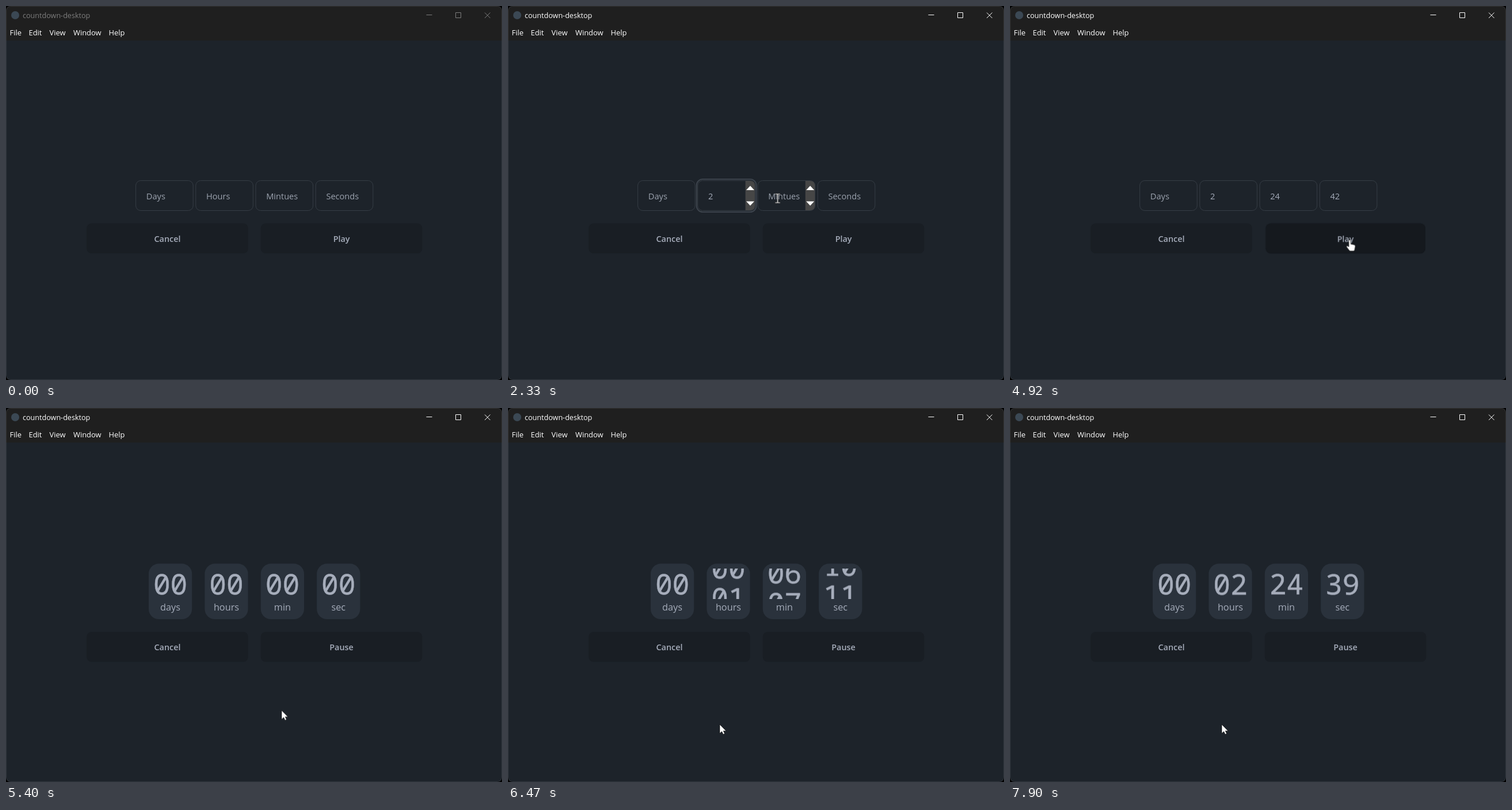
An HTML page for the animation above (8 s loop, 862 by 650 pixels).

```html
<!DOCTYPE html>
<html lang="en">
<head>
<meta charset="utf-8">
<title>countdown-desktop</title>
<style>
  html, body { margin: 0; width: 100%; height: 100%; overflow: hidden; background: #000; }
  svg { display: block; border-radius: 8px; background: #1d232a; font: 14.6px 'Open Sans', sans-serif; }
  text { fill: #a6adbb; white-space: pre; }
  .chrome { color: #fff; font-size: 12.6px; animation: wake 8s step-end infinite; }
  .chrome text { fill: currentColor; }
  .chrome path { fill: none; stroke: currentColor; }
  .menu text { fill: #fff; font-size: 12.9px; }
  .field { fill: none; stroke: #363d45; }
  .ring { fill: none; stroke: #3c434c; stroke-width: 2; }
  .placeholder { fill: #9ca3af; }
  .button { fill: #191e24; }
  .hover { fill: #15191e; }
  .label { font-size: 14.4px; font-weight: 600; text-anchor: middle; }
  .card { fill: #2a323c; }
  .unit { font-size: 16.3px; text-anchor: middle; }
  .digits { font: 49.5px 'Noto Sans Mono', monospace; text-anchor: middle; animation: roll 8s infinite; }
  .digits text { stroke: #a6adbb; stroke-width: .5; }
  .mouse { animation: move 8s infinite; }
  .mouse path { fill: #fff; stroke: #000; stroke-width: .6; stroke-linejoin: round; }

  @keyframes wake { 0% { color: #7d7d7d } 19.375%, 100% { color: #fff } }
  @keyframes roll {
    0%, 74.85% { transform: translateY(0); animation-timing-function: cubic-bezier(1, 0, 0, 1) }
    87.35% { transform: translateY(calc(var(--first) * -52.3px)); animation-timing-function: cubic-bezier(1, 0, 0, 1) }
    99.85%, 100% { transform: translateY(calc(var(--second) * -52.3px)) }
  }
  @keyframes move {
    0%, 2.375% { transform: translate(622px, 574px); animation-timing-function: linear }
    6.25% { transform: translate(520px, 505px); animation-timing-function: linear }
    9.375% { transform: translate(415px, 436px); animation-timing-function: linear }
    11.75% { transform: translate(393px, 384px); animation-timing-function: ease-out }
    16%, 24.375% { transform: translate(380px, 336px); animation-timing-function: ease-in-out }
    31%, 37.5% { transform: translate(486px, 334px); animation-timing-function: ease-in }
    40.125% { transform: translate(546px, 332px); animation-timing-function: linear }
    41% { transform: translate(572px, 332px); animation-timing-function: ease-out }
    43.125%, 55.375% { transform: translate(588px, 334px); animation-timing-function: ease-in-out }
    59.75%, 62.5% { transform: translate(590.5px, 406.5px); animation-timing-function: ease-out }
    67.5% { transform: translate(479px, 525.5px); animation-timing-function: ease-out }
    71.875%, 74.125% { transform: translate(472px, 528px); animation-timing-function: ease-in-out }
    78.75%, 100% { transform: translate(368px, 550px) }
  }
</style>
</head>
<body>
<svg id="stage" width="862" height="650" viewBox="0 0 862 650"></svg>
<script>
const LOOP = 8000;
const SWITCH = 4990;
const PRESS = 4850;
const WIDTH = 99.6;

// Alternating show and hide times in ms
const on = (...times) => `data-on="${times.join(' ')}"`;
const box = (x, y, w, h, r, attrs) =>
  `<rect x="${x}" y="${y}" width="${w}" height="${h}" rx="${r}" ${attrs}/>`;
const text = (x, y, string, attrs = '') => `<text x="${x}" y="${y}" ${attrs}>${string}</text>`;

const fields = [
  { label: 'Days', typed: [] },
  { label: 'Hours', focus: [1550, 2550], spin: [1110, 2550], typed: [[1750, '2']] },
  { label: 'Mintues', focus: [2550, 3550], spin: [2250, 3550], typed: [[2750, '2'], [2950, '24']] },
  { label: 'Seconds', focus: [3550, PRESS], spin: [3190, PRESS], typed: [[3770, '4'], [4230, '42']] },
];

const counters = [
  { unit: 'days', first: 0, second: 0 },
  { unit: 'hours', first: 2, second: 2 },
  { unit: 'min', first: 24, second: 24 },
  { unit: 'sec', first: 40, second: 39 },
];

function spinner(x, times) {
  const left = x + 82.8, right = x + WIDTH - .5, mid = x + 91.2;
  return `<g ${on(...times)}>
    <path d="M${left} 304H${right - 8}q8 0 8 8V347q0 8-8 8H${left}z" fill="#464646"/>
    <path d="M${mid - 7} 320l7-7.5 7 7.5zM${mid - 7} 339.5l7 7.5 7-7.5z" fill="#fff"/></g>`;
}

function carets(x, start, end) {
  const times = [];
  for (let t = start; t < end; t += 1000) times.push(t, Math.min(t + 500, end));
  return times.length ? box(x, 320, 1, 19.5, 0, `fill="#a6adbb" ${on(...times)}`) : '';
}

function field({ label, focus, spin, typed }, i) {
  const x = 225.6 + 104.2 * i, textX = x + 18.2;
  const stages = [[0, label], ...typed];
  let out = box(x, 303.5, WIDTH, 52, 8.5, 'class="field"');
  if (focus) out += box(x - 2, 301, WIDTH + 4, 57, 10.5, `class="ring" ${on(...focus)}`) + spinner(x, spin);
  stages.forEach(([start, value], k) => {
    const end = k + 1 < stages.length ? stages[k + 1][0] : LOOP;
    out += text(textX, 335.5, value, `class="${k ? '' : 'placeholder'}" ${on(start, end)}`);
    if (focus) {
      const caretX = textX + (k ? value.length * 8.35 : 0);
      out += carets(caretX, Math.max(start, focus[0]), Math.min(end, focus[1]));
    }
  });
  return out;
}

function button(x, y, label, hover) {
  const face = attrs => box(x, y, 280.6, 52.3, 8.7, attrs);
  return face('class="button"') + (hover ? face(`class="hover" ${on(...hover)}`) : '')
    + text(x + 140.3, y + 32.2, label, 'class="label"');
}

function counter({ unit, first, second }, i) {
  const x = 248 + 97.4 * i, mid = x + 37.6;
  let rows = '';
  for (let n = 0; n <= first + 1; n++) rows += text(mid, 324 + 52.3 * n, String(n).padStart(2, '0'));
  return box(x, 270.6, 75.2, 96.4, 17.4, 'class="card"')
    + `<g clip-path="url(#row)"><g class="digits" style="--first:${first};--second:${second}">${rows}</g></g>`
    + text(mid, 352, unit, 'class="unit"');
}

const menu = [[6.5, 'File'], [39.5, 'Edit'], [75.5, 'View'], [117, 'Window'], [178.5, 'Help']];

const shapes = {
  arrow: ['M0 0V15.5L3.6 12.2 6 17.2 8.6 16 6.3 11.2H11z', 190, 780, 1010, 1110, 4520, 4610, 5090, LOOP],
  hand: ['M-1.7 1.5a1.7 1.7 0 0 1 3.4 0V7.2l6 1.3q2 .6 1.8 2.8l-1 6q-.3 2-2 2H1q-1.3 0-2.1-1.2L-5.5 12.3q-.6-1.7 1-2l2.8 1.7z',
    780, 1010, 4610, 5090],
  beam: ['M-4.5-8.5H-1L0-8 1-8.5H4.5V-6.8H1V6.8H4.5V8.5H1L0 8-1 8.5H-4.5V6.8H-1V-6.8H-4.5z', 1110, 4520],
};

document.getElementById('stage').innerHTML = `
  <clipPath id="row"><rect x="240" y="279.4" width="390" height="52.3"/></clipPath>
  <rect width="862" height="60" fill="#1f1f1f"/>
  <circle cx="16" cy="16" r="7" fill="#3b4854"/>
  <g class="chrome">${text(29, 21, 'countdown-desktop')}
    <path d="M730.5 15.5h10M781.5 11.5h9v9h-9zM832 11.5l9.5 9.5M841.5 11.5l-9.5 9.5"/></g>
  <g class="menu">${menu.map(([x, name]) => text(x, 50.8, name)).join('')}</g>
  <g ${on(0, SWITCH)}>
    ${fields.map(field).join('')}
    ${button(140.2, 377.8, 'Cancel', [780, 1010])}
    <g ${on(0, PRESS)}>${button(442.8, 377.8, 'Play', [4610, PRESS])}</g>
    <g transform="translate(583.1 404) scale(.988) translate(-583.1 -404)" ${on(PRESS, SWITCH)}>
      ${button(442.8, 377.8, 'Play', [PRESS, SWITCH])}</g>
  </g>
  <g ${on(SWITCH, LOOP)}>
    ${counters.map(counter).join('')}
    ${button(140.2, 389, 'Cancel')}
    ${button(442.8, 389, 'Pause', [SWITCH, 5090])}
  </g>
  <g class="mouse">${Object.values(shapes).map(([d, ...times]) => `<path d="${d}" ${on(...times)}/>`).join('')}</g>
  ${box(.5, .5, 861, 649, 7.5, 'fill="none" stroke="#fff" stroke-opacity=".09"')}`;

// Turn every list of times into a stepped opacity animation
const sheet = document.createElement('style');
document.querySelectorAll('[data-on]').forEach((el, i) => {
  const times = el.dataset.on.split(' ').map(Number);
  const steps = times.map((t, k) => `${t / LOOP * 100}%{opacity:${1 - k % 2}}`);
  if (times[0] > 0) steps.unshift('0%{opacity:0}');
  sheet.textContent += `@keyframes toggle${i}{${steps.join('')}}`;
  el.style.animation = `toggle${i} ${LOOP}ms step-end infinite`;
});
document.head.append(sheet);
</script>
</body>
</html>
```
